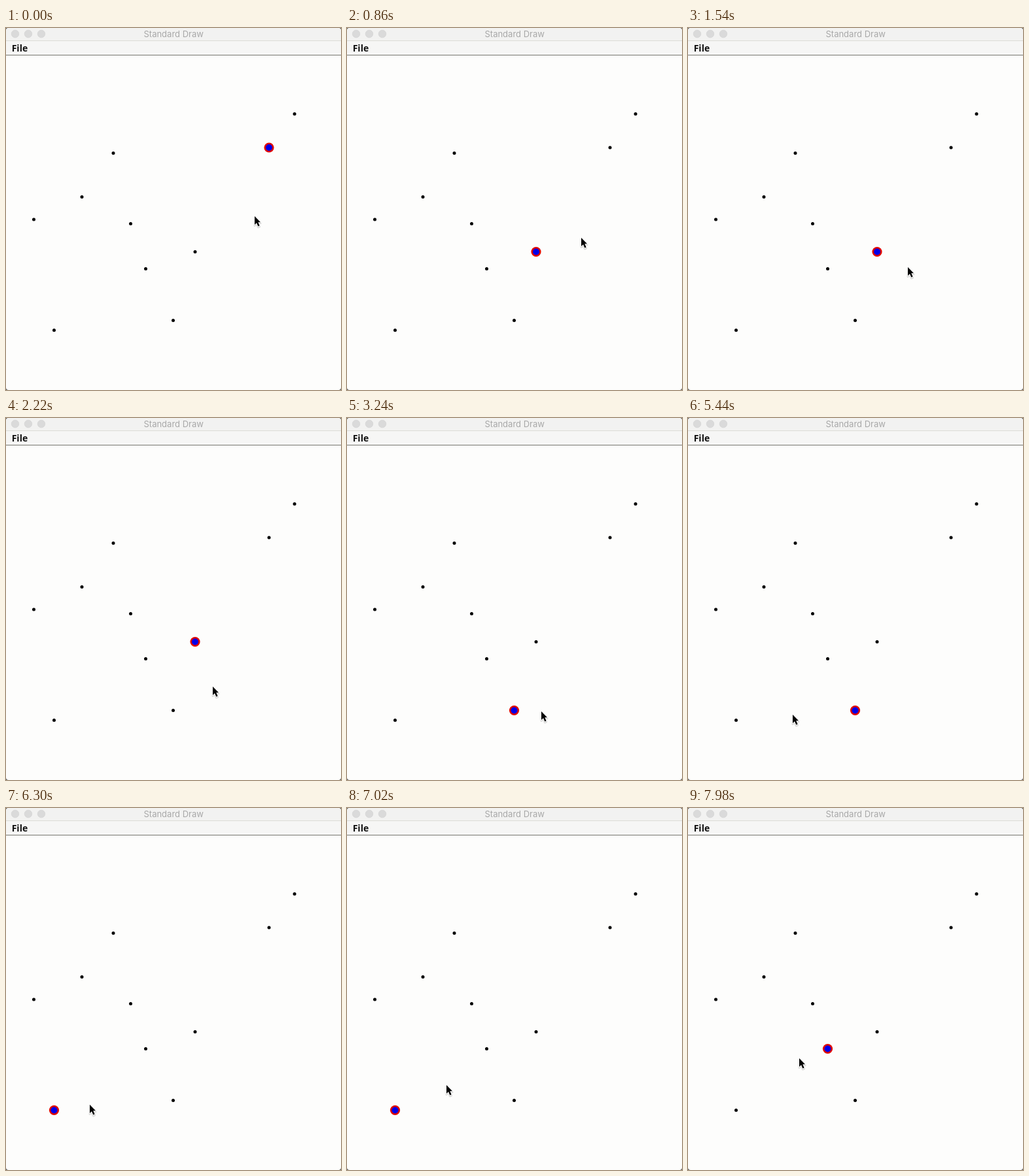
Animation of 512 by 554 pixels, one loop 8 s. Source, as an HTML page:

```html
<!DOCTYPE html>
<html lang="en">
<head>
<meta charset="utf-8">
<title>Nearest point</title>
<style>
  html, body { margin: 0; height: 100%; overflow: hidden; background: #555; }
  svg { display: block; width: 512px; height: 554px; }
  .title { font: 13px Inter, sans-serif; fill: #a8a8a8; text-anchor: middle; }
  .menu { font: 600 14px "Noto Sans", sans-serif; fill: #111; }
</style>
</head>
<body>
<svg viewBox="0 0 512 554">
  <clipPath id="window"><rect width="512" height="554" rx="4"/></clipPath>
  <g clip-path="url(#window)">
    <rect width="512" height="554" fill="#fdfdfc"/>
    <rect width="512" height="20" fill="#f2f2f1"/>
    <rect y="19" width="512" height="1" fill="#dcdcd6"/>
    <rect y="20" width="512" height="21" fill="#f6f6f5"/>
    <rect y="41" width="512" height="1" fill="#777770"/>
    <g id="buttons" fill="#dadada" stroke="#d0d0d0" stroke-width=".6"></g>
    <text class="title" x="256.2" y="14">Standard Draw</text>
    <text class="menu" x="8.7" y="36">File</text>
    <g id="dots"></g>
    <g id="marker">
      <circle r="7.6" fill="#e00800"/>
      <circle r="5" fill="#0000e8"/>
    </g>
    <g id="cursor">
      <path id="arrow" d="M1 1V14L4 11.2 6.3 16.5 8.6 15.5 6.3 10.3H10Z" stroke-linejoin="round"/>
      <use href="#arrow" y="1.5" opacity=".12" stroke="#000" stroke-width="3"/>
      <use href="#arrow" stroke="#fdfdfc" stroke-width="1.8"/>
      <use href="#arrow"/>
    </g>
  </g>
</svg>
<script>
const LOOP = 8000;
const points = [[441, 131.5], [402, 183], [164, 191.5], [116, 258.5], [42.5, 293],
  [190.5, 299.5], [289, 342.5], [213.5, 368.5], [255.5, 447.5], [73.5, 462.5]];

// Pointer path: step, x, y
const path = [[0, 379, 287], [19, 357, 320], [47, 315, 410], [70, 296, 448], [91, 231, 474],
  [106, 201, 453], [116, 159, 453], [126, 128, 453], [135, 127, 453], [151, 151, 423],
  [171, 169, 382]];

const byId = id => document.getElementById(id);
const place = (node, [x, y]) => node.setAttribute("transform", `translate(${x} ${y})`);
const circles = (centers, r) =>
  centers.map(([x, y]) => `<circle cx="${x}" cy="${y}" r="${r}"/>`).join("");

byId("buttons").innerHTML = circles([0, 1, 2].map(i => [14 + 20 * i, 9]), 5.8);
byId("dots").innerHTML = circles(points, 2.5);

// The picture advances three steps every 140 ms, at 0, 20 and 120 ms
function stepAt(time) {
  const phase = time % 140;
  return 3 * Math.floor(time / 140) + (phase >= 20) + (phase >= 120);
}

const slope = (i, axis) => (path[i + 1][axis] - path[i][axis]) / (path[i + 1][0] - path[i][0]);

// Harmonic mean of the neighbouring slopes avoids overshoot
function tangent(i, axis) {
  const a = slope(Math.max(i - 1, 0), axis);
  const b = slope(Math.min(i, path.length - 2), axis);
  return a * b > 0 ? 2 * a * b / (a + b) : 0;
}

function pointerAt(step) {
  let i = 0;
  while (i < path.length - 2 && path[i + 1][0] <= step) i++;
  const [from, to] = [path[i], path[i + 1]];
  const span = to[0] - from[0];
  const u = (step - from[0]) / span, v = 1 - u;
  return [1, 2].map(axis => Math.round(
    from[axis] * v * v * (1 + 2 * u) + to[axis] * u * u * (3 - 2 * u) +
    span * u * v * (tangent(i, axis) * v - tangent(i + 1, axis) * u)));
}

function nearest([x, y]) {
  const distance = p => Math.hypot(p[0] - x, p[1] - y);
  return points.reduce((best, p) => distance(p) < distance(best) ? p : best);
}

const start = performance.now();
function draw() {
  const step = stepAt((performance.now() - start) % LOOP);
  place(byId("cursor"), pointerAt(step));
  place(byId("marker"), nearest(pointerAt(step - 2))); // the marker lags the pointer
  requestAnimationFrame(draw);
}
draw();
</script>
</body>
</html>
```
